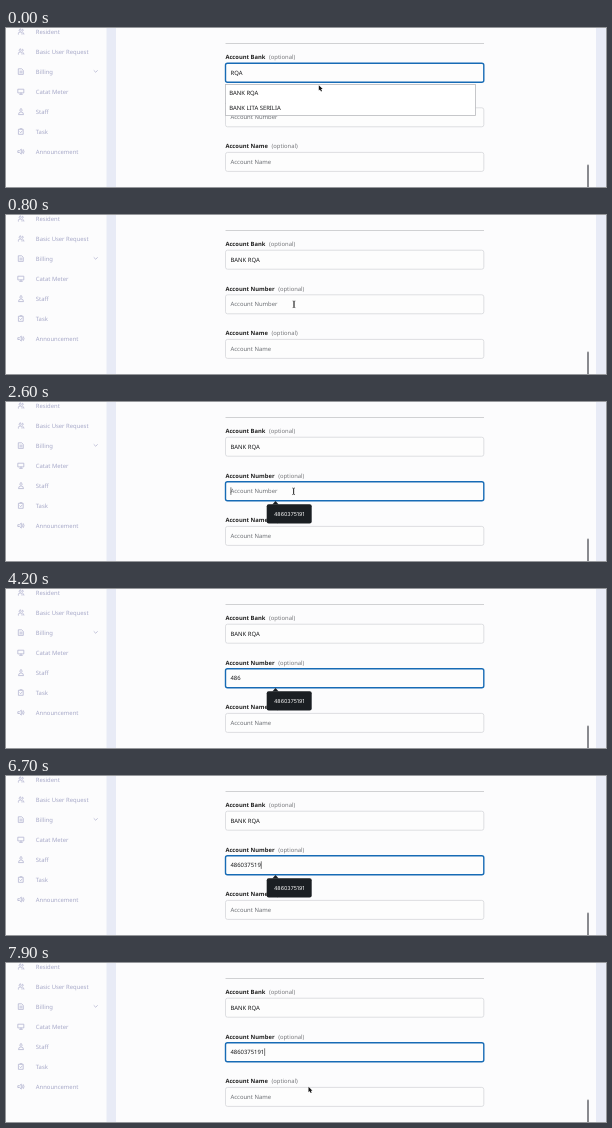
Write an HTML page that moves like this. It is 600 by 159 pixels and loops after 8000 ms.

```html
<!DOCTYPE html>
<html lang="en">
<head>
<meta charset="utf-8">
<style>
html, body { margin: 0; width: 100%; height: 100%; overflow: hidden; background: #fcfcfd; }
svg { display: block; }
text { font: 5.9px "Noto Sans", "Open Sans", sans-serif; fill: #17181a; text-rendering: geometricPrecision; }
.nav text { font-weight: 500; fill: #a6a8c8; }
.nav path { fill: none; stroke: #b0b2cf; stroke-width: .75; stroke-linecap: round; stroke-linejoin: round; }
.label { font-weight: 700; font-size: 5.8px; fill: #222; }
.soft { font-size: 5.85px; fill: #77787c; }
.hint { fill: #6d7075; }
.box { fill: #fdfdfd; stroke: #d6d7db; stroke-width: .8; }
.focus { stroke: #176bb5; stroke-width: 1.4; }
#tip text { font: 5.35px Inter, sans-serif; fill: #fff; }
</style>
</head>
<body>
<svg width="600" height="159" viewBox="0 0 600 159">
  <path fill="#e8ebf6" d="M100.5 0h9.5v159h-9.5zM590 0h10v159h-10z"/>
  <path fill="#898a8f" d="M581 159v-21.5q0-1 1-1t1 1V159z"/>
  <path stroke="#c6c7ca" stroke-width=".8" d="M219.5 15.5H478"/>
  <g id="nav" class="nav"><path d="M88 42.6l1.7 1.6 1.7-1.6"/></g>
  <g id="form"></g>
  <path id="caret" stroke="#222" stroke-width=".6" d="M0 85.3v7.6"/>
  <g id="list">
    <rect x="219.5" y="56.5" width="250" height="31" fill="#fff" stroke="#b9babd" stroke-width=".8"/>
    <rect id="hover" x="220" y="57" width="249" height="15.2" fill="#d9191e"/>
    <text id="first" x="223.2" y="66.7">BANK RQA</text>
    <text x="223.2" y="81.9">BANK LITA SERILIA</text>
  </g>
  <g id="tip">
    <path fill="#1b1f23" d="M266.3 102.5l3.2-3.6 3.2 3.6z"/>
    <rect x="260.7" y="102.2" width="45" height="19.2" rx="2" fill="#1b1f23"/>
    <text x="283.2" y="113.8" text-anchor="middle"></text>
  </g>
  <path id="arrow" d="M0 0v5.4l1.2-1.1 1 2 1-.5-1-1.9h1.7z" fill="#111" stroke="#fff" stroke-width=".5" paint-order="stroke"/>
  <path id="beam" d="M-1.3-3.3Q0-3.3 0-2.5V2.5Q0 3.3-1.3 3.3M1.3-3.3Q0-3.3 0-2.5V2.5Q0 3.3 1.3 3.3" fill="none" stroke="#222" stroke-width=".7"/>
</svg>
<script>
const $ = id => document.getElementById(id);
const ACCOUNT = "4860375191", DIGIT = 3.375, TEXT_X = 224.5;
const keyTimes = [2800, 3300, 3700, 5000, 5300, 5600, 6100, 6300, 6700, 6800];
const caretOff = [[4200, 4700], [7300, 7800]];

// time, x, y of the pointer
const pick = [[0, 312.8, 57.2], [100, 310, 60], [300, 304, 66.7], [400, 304, 66.7], [800, 288, 89.3]];
const leave = [[7100, 289, 91], [7300, 298, 102], [7500, 306, 112], [7700, 307, 121], [7900, 302.5, 123.8]];

const people = "M-2.6 2.6V1.6Q-2.6.4-.8.4T1 1.6v1M-.8-2.6a1.1 1.1 0 1 0 .01 0M1.3-2.4a1 1 0 0 1 0 2M1.8.6q1.1.2 1.1 2";
const person = "M-2.5 2.6q0-2.3 2.5-2.3t2.5 2.3zM0-2.8a1.2 1.2 0 1 0 .01 0";
const items = [
  ["Resident", people],
  ["Basic User Request", people],
  ["Billing", "M-2.3-2.8h3l1.6 1.6v4h-4.6zM-1.1-.4h2.2M-1.1 1.2h2.2"],
  ["Catat Meter", "M-2.8-2.4h5.6v3.7h-5.6zM0 1.3v1.3M-1.4 2.7h2.8"],
  ["Staff", person],
  ["Task", "M-2.2-2.3h4.4v5h-4.4zM-.9-2.9h1.8M-1.1.3l.8.8 1.4-1.7"],
  ["Announcement", "M-2.8-.9h1.3l1.8-1.6v5L-1.5.9h-1.3zM1.4-1q.8 1 0 2M2.4-2q1.6 2 0 4"]
];
items.forEach(([name, icon], i) => {
  const y = 3.6 + 20 * i;
  $("nav").innerHTML += `<path transform="translate(15 ${y})" d="${icon}"/><text x="29.8" y="${y + 2}">${name}</text>`;
});

["Bank", "Number", "Name"].forEach((name, i) => {
  const y = 44.6 * i;
  $("form").innerHTML += `<text class="label" x="219.4" y="${31.2 + y}">Account ${name}<tspan class="soft" font-weight="400" style="font-weight:400" dx="3.6">(optional)</tspan></text>
    <rect id="box${i}" class="box" x="219.5" y="${35.2 + y}" width="258.3" height="19" rx="2"/>
    <text id="value${i}" x="${TEXT_X}" y="${46.8 + y}" class="hint">Account ${name}</text>`;
});
$("value0").classList.remove("hint");
$("tip").querySelector("text").textContent = ACCOUNT;

const show = (id, on) => $(id).style.display = on ? "" : "none";
const place = (id, [x, y]) => $(id).setAttribute("transform", `translate(${x} ${y})`);

function along(path, t) {
  const i = path.findIndex(p => p[0] >= t);
  if (i < 0) return path.at(-1).slice(1);
  if (!i) return path[0].slice(1);
  const [a, b] = [path[i - 1], path[i]], k = (t - a[0]) / (b[0] - a[0]);
  return [1, 2].map(n => a[n] + (b[n] - a[n]) * k);
}

function draw(t) {
  const open = t < 500, hover = t >= 100;
  show("list", open);
  show("hover", hover);
  $("first").style.fill = hover ? "#ffe3e3" : "";
  $("value0").textContent = open ? "RQA" : "BANK RQA";

  const focused = t >= 2500;
  $("box0").classList.toggle("focus", t < 300);
  $("box1").classList.toggle("focus", focused);
  const typed = keyTimes.filter(k => t >= k).length;
  $("value1").textContent = ACCOUNT.slice(0, typed) || "Account Number";
  $("value1").classList.toggle("hint", !typed);
  show("caret", focused && !caretOff.some(([a, b]) => t >= a && t < b));
  place("caret", [TEXT_X + .4 + DIGIT * typed, 0]);

  show("tip", focused && t < 6800);
  $("tip").style.opacity = t < 2600 ? .5 : 1;

  const leaving = t >= 7100;
  const pos = leaving ? along(leave, t) : along(pick, t);
  if (t >= 2300 && !leaving) pos[0] = 287.6;
  const beam = pos[1] > 79.5 && pos[1] < 99;
  show("beam", beam && (t < 2800 || leaving));
  show("arrow", !beam);
  place("beam", pos);
  place("arrow", pos);
}

function tick() {
  draw(Math.floor(performance.now() % 8000 / 100) * 100);
  requestAnimationFrame(tick);
}
tick();
</script>
</body>
</html>
```
